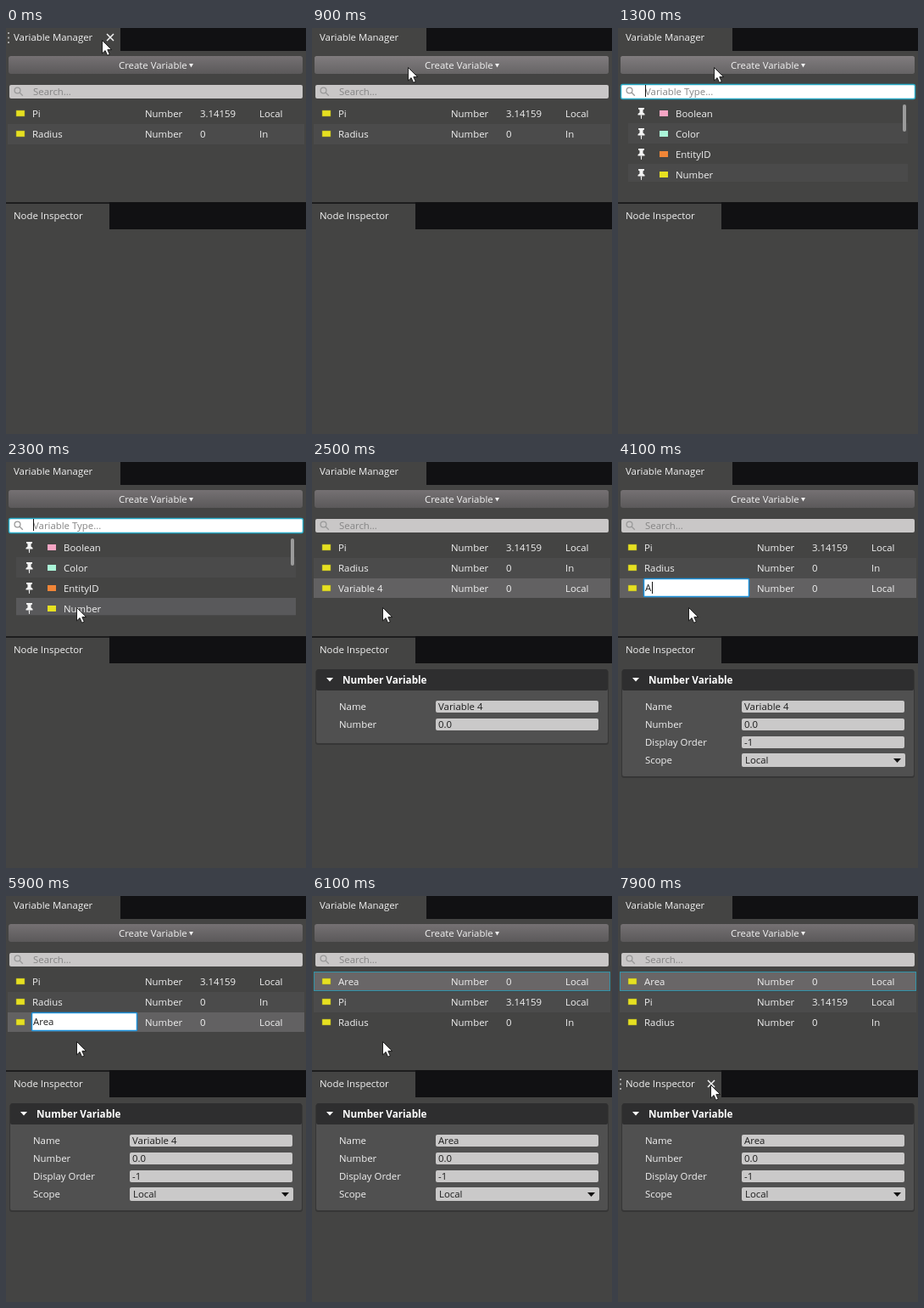
Write an HTML page that moves like this. It is 354 px wide and 478 px high and loops after 8 s.

```html
<!DOCTYPE html>
<html lang="en">
<head>
<meta charset="utf-8">
<title>Variable Manager</title>
<style>
  html, body { margin: 0; width: 100%; height: 100%; overflow: hidden; background: #444443; }
  svg { display: block; width: 354px; height: 478px; }
  text { font: 11.4px "Open Sans", "Noto Sans", sans-serif; fill: #f2f2f2; white-space: pre; }
  .bold { font-size: 11.7px; font-weight: 700; fill: #fff; }
  .dark { fill: #1c1c1c; }
  .hint { fill: #858585; }
  .field { fill: #cac9c9; }
</style>
</head>
<body>
<svg id="stage" viewBox="0 0 354 478">
  <defs>
    <linearGradient id="button" x2="0" y2="1">
      <stop stop-color="#757173"/><stop offset="1" stop-color="#5b595a"/>
    </linearGradient>
    <linearGradient id="buttonHover" x2="0" y2="1">
      <stop stop-color="#807c7e"/><stop offset="1" stop-color="#666465"/>
    </linearGradient>
    <g id="pin" fill="#f4f4f4">
      <path d="M-3.5-6h7v1.5l-1.5 1v3l2 1.5v1.5h-8V1l2-1.5v-3l-1.5-1z"/>
      <path d="M-.7 2.5H.7L.4 7h-.8z"/>
    </g>
    <g id="lens" fill="none" stroke="#9a9a9a" stroke-width="1.3">
      <circle cx="13.5" cy="73.5" r="3.4"/><path d="M16 76l3.8 3.8"/>
    </g>
    <g id="tabTools">
      <path d="M2 5h2v2H2zM2 10.500h2v2H2zM2 16h2v2H2z" fill="#a5a5a5"/>
    </g>
    <path id="close" d="M-4-4L4 4M4-4L-4 4" stroke="#f4f4f4" stroke-width="1.5"/>
  </defs>
</svg>
<script>
const LOOP = 8000;
const YELLOW = '#e6e021';
const stage = document.getElementById('stage');
const timed = [];

const rect = (x, y, w, h, fill, extra = '') =>
  `<rect x="${x}" y="${y}" width="${w}" height="${h}" fill="${fill}" ${extra}/>`;
const text = (x, y, str, cls = '') => `<text x="${x}" y="${y}" class="${cls}">${str}</text>`;
const path = (d, fill) => `<path d="${d}" fill="${fill}"/>`;
const use = (id, x = 0, y = 0) => `<use href="#${id}" x="${x}" y="${y}"/>`;
const caret = (x, y) => rect(x, y, 1, 14, '#111');

// Adds a group, visible only in the given [from, to) spans
function add(markup, ...spans) {
  const g = document.createElementNS('http://www.w3.org/2000/svg', 'g');
  g.innerHTML = markup;
  stage.append(g);
  if (spans.length) timed.push({ g, spans });
}

function row(i, name, value, scope) {
  const y = 105 + 24 * i;
  return rect(12, y - 8, 10, 7, YELLOW, 'stroke="#8d8a2c" stroke-width=".5"') +
    text(31, y, name) + text(164, y, 'Number') + text(229, y, value) + text(299, y, scope);
}

function option(i, name, color) {
  const y = 105 + 24 * i;
  return use('pin', 27.5, y - 5) + rect(49, y - 8, 10, 7, color) + text(68, y, name);
}

function panel(count, bottom) {
  const rows = [['Name', ''], ['Number', '0.0'], ['Display Order', '-1'], ['Scope', 'Local']];
  let out = rect(4, 245, 346, bottom - 243, '#363636', 'rx="3"') +
    rect(5, 244, 344, bottom - 244, '#505050', 'rx="2"') +
    rect(5, 244, 344, 25, '#2e2e2f', 'rx="2"') +
    path('M17 254h8l-4 4.500z', '#fff') + text(36, 261, 'Number Variable', 'bold');
  rows.slice(0, count).forEach(([label, value], i) => {
    const y = 281 + 21 * i, scope = i === 3;
    out += text(32, y + 11, label) +
      rect(146, scope ? y - 1 : y, scope ? 193 : 192, scope ? 16 : 14, '#cac9c9', 'rx="2"') +
      text(scope ? 150 : 149, y + 11, value, 'dark');
  });
  return count > 3 ? out + path('M325 349h9l-4.500 5z', '#111') : out;
}

// Window chrome
add(rect(0, 0, 354, 478, '#444443') +
  rect(135, 0, 219, 27, '#111113') + text(9, 15, 'Variable Manager') +
  rect(0, 205, 354, 2, '#1d1d1e') + rect(122, 205, 232, 32, '#111113') +
  text(9, 225, 'Node Inspector'));
add(use('tabTools') + use('close', 123, 11), [0, 700]);
add(use('tabTools', 0, 210) + use('close', 110, 221), [7900, LOOP]);

const button = id => rect(3, 33, 347, 21, `url(#${id})`, 'rx="3"');
add(button('button'));
add(button('buttonHover'), [700, 1900]);
add(text(133, 48, 'Create Variable') + path('M216 42h5l-2.500 4.500z', '#f2f2f2'));

// Variable list
add(rect(4, 67, 346, 16, '#c9c7c7', 'rx="2"') + use('lens') + text(32, 79, 'Search...', 'hint') +
  rect(2, 113, 350, 24, '#4b4b4b'), [0, 1300], [2500, LOOP]);
add(row(0, 'Pi', '3.14159', 'Local') + row(1, 'Radius', '0', 'In'), [0, 1300], [2500, 6100]);
add(rect(2, 137, 350, 23, '#626162') + row(2, '', '0', 'Local'), [2500, 6100]);
add(text(31, 153, 'Variable 4'), [2500, 2700]);
add(rect(2.5, 89.5, 349, 22, '#696667', 'stroke="#3193a9"') +
  row(0, 'Area', '0', 'Local') + row(1, 'Pi', '3.14159', 'Local') + row(2, 'Radius', '0', 'In'),
  [6100, LOOP]);

// Name editing
add(rect(30.5, 137.5, 124, 21, '#fff', 'stroke="#1b8fd8" stroke-width="1.5" rx="1"'), [2700, 6100]);
add(rect(32, 141, 54, 15, '#1673c6') + '<text x="32" y="152" fill="#fff">Variable 4</text>', [2700, 3700]);
[['A', 40, 3700, 4700, 4700], ['Are', 51, 4700, 5100, 5100], ['Area', 57, 5100, 6100, 5900]]
  .forEach(([str, x, from, to, blink]) => {
    add(text(32, 152, str, 'dark'), [from, to]);
    add(caret(x, 141), [from, blink]);
  });

// Type picker
add(rect(3.5, 66.5, 347, 17, '#fff', 'stroke="#27a9c4" stroke-width="1.4" rx="2"') + use('lens') +
  text(32, 79, 'Variable Type...', 'hint') +
  rect(12, 112, 330, 24, '#4a4a4a') + rect(12, 160, 330, 21, '#4a4a4a') +
  rect(336, 90, 4, 32, '#9b9b9b', 'rx="2"'), [1300, 2500]);
add(rect(12, 160, 330, 20, '#59595b'), [2100, 2500]);
add(option(0, 'Boolean', '#f6a5c4') + option(1, 'Color', '#aaf5d8') +
  option(2, 'EntityID', '#f08537') + option(3, 'Number', YELLOW), [1300, 2500]);
add(caret(32, 67), [1300, 2100], [2300, 2500]);

// Inspector
add(panel(2, 331), [2500, 2700]);
add(panel(4, 370), [2700, LOOP]);
add(text(149, 292, 'Variable 4', 'dark'), [2500, 6100]);
add(text(149, 292, 'Area', 'dark'), [6100, LOOP]);

// Pointer: time, x, y
const moves = [
  [0, 113, 14], [500, 113, 17], [700, 113, 46], [1700, 112, 47], [1900, 96, 133],
  [2100, 84, 169], [2300, 83, 171], [7500, 83, 172], [7700, 96, 201], [7900, 109, 222]
];
add('<path d="M.5.5v15.500l3.600-3.400 2.500 5.700 2.700-1.200-2.500-5.500h4.900z" fill="#fff" stroke="#111" stroke-width=".9"/>');
const pointer = stage.lastChild;

function draw(now) {
  const t = now % LOOP;
  for (const { g, spans } of timed) {
    g.style.display = spans.some(([from, to]) => t >= from && t < to) ? '' : 'none';
  }
  const [, x, y] = moves.findLast(m => m[0] <= t);
  pointer.setAttribute('transform', `translate(${x} ${y})`);
}

const start = performance.now();
function tick() {
  draw(performance.now() - start);
  requestAnimationFrame(tick);
}
tick();
</script>
</body>
</html>
```
